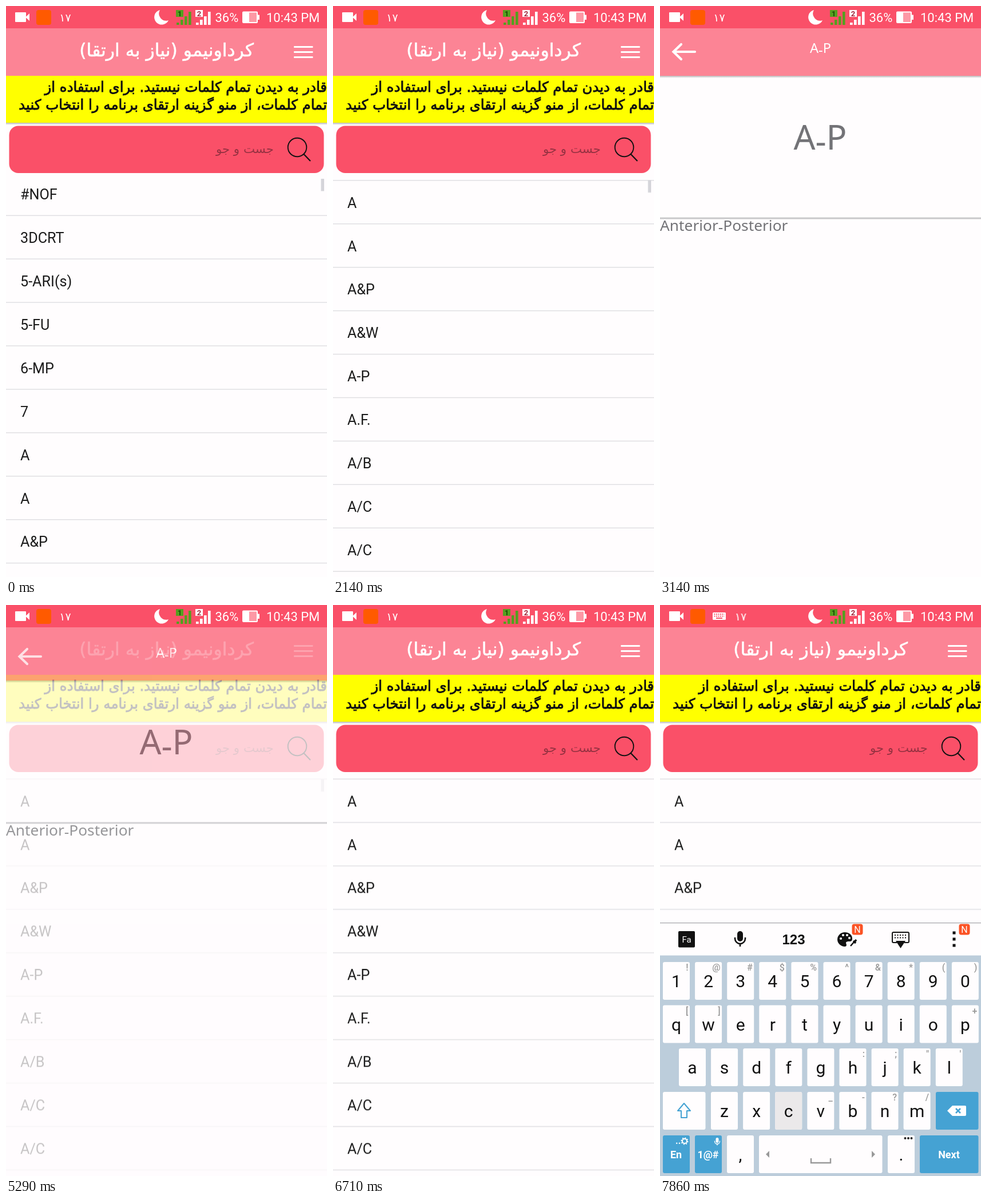
Recreate the animation shown at these times as an HTML page. Size 561 by 998 pixels, loop 8000 ms.

```html
<!DOCTYPE html>
<html lang="fa">
<head>
<meta charset="utf-8">
<style>
html, body { margin: 0; width: 100%; height: 100%; overflow: hidden; background: #fffdfe; }
svg { display: block; width: 561px; height: 998px; }
text { font-family: Roboto, sans-serif; white-space: pre; }
.fa { font-family: "DejaVu Sans", sans-serif; direction: rtl; }
.page { font-family: "Noto Sans", "Open Sans", sans-serif; }
.num { font-family: "Liberation Sans", Arial, sans-serif; font-weight: bold; }
.banner { stroke: #111; stroke-width: .9; }
</style>
</head>
<body>
<script>
const LOOP = 8000, ROW = 75.93;
const PINK = '#fc8495', RED = '#fa5068', PAPER = '#fffdfe', BLUE = '#45a2d3';

const rect = (x, y, w, h, fill, rx = 0, more = '') =>
  `<rect x="${x}" y="${y}" width="${w}" height="${h}" fill="${fill}" rx="${rx}" ${more}/>`;
const text = (s, x, y, size, fill, more = '') =>
  `<text x="${x}" y="${y}" font-size="${size}" fill="${fill}" ${more}>${s.replace(/&/g, '&amp;')}</text>`;
const path = (d, fill, more = '') => `<path d="${d}" fill="${fill}" ${more}/>`;
const line = (d, stroke, width, more = '') =>
  path(d, 'none', `stroke="${stroke}" stroke-width="${width}" ${more}`);
const group = (id, body, more = '') => `<g id="${id}" ${more}>${body}</g>`;
const MID = 'text-anchor="middle"', END = 'text-anchor="end"', BOLD = 'font-weight="bold"';

function signal(x, n, color, ink) {
  const bars = [4, 9, 15, 23].map((h, i) => rect(x + 1 + i * 7, 33 - h, 4.6, h, color)).join('');
  return bars + rect(x, 7, 13, 12, color) + text(n, x + 6.5, 17.5, 13, ink, `${MID} ${BOLD}`);
}

// Small keyboard glyph: frame with rows of dots
function dots(x, y, w, rows, step, color) {
  let d = '';
  for (let r = 0; r < rows; r++) d += `M${x} ${y + r * step}h${w}`;
  return line(d, color, 2, `stroke-dasharray="2 ${step - 2}"`);
}

const mic = (x, y, k, color) => `<g transform="translate(${x} ${y}) scale(${k})">` +
  rect(-5, -14, 10, 18, color, 5) +
  line('M-9-3v2a9 9 0 0 0 18 0v-2M0 8v5', color, 2.6) + '</g>';

function statusBar() {
  return rect(0, 0, 561, 39, RED) +
    rect(16, 11, 19, 17, '#fff', 1) + path('M34 19.5L41 13V26Z', '#fff') +
    rect(53, 7, 26, 26, '#ff5a00', 4) +
    group('imeIcon', rect(92, 13, 23, 13, '#fff', 1.5) + dots(94.5, 16, 18, 2, 3.5, RED) + line('M98 23h11', RED, 2)) +
    group('count', text('١٧', 103.5, 27, 19, '#fff', `class="fa" ${MID}`)) +
    path('M269 7A13 13 0 1 0 284 25A12.5 12.5 0 0 1 269 7Z', '#fff') +
    signal(297, '1', '#55a01f', '#1d4a08') + signal(331, '2', '#fff', '#a3283c') +
    text('36%', 365.5, 28, 22, '#fff') +
    rect(414, 10.5, 25, 18.5, '#fd98a5', 1, 'stroke="#fff" stroke-width="2"') +
    rect(414, 11, 11, 18, '#fff') + rect(440, 15.5, 3, 8.5, '#fff') +
    text('10:43 PM', 455, 28, 22, '#fff');
}

const WORDS = ['#NOF', '3DCRT', '5-ARI(s)', '5-FU', '6-MP', '7', 'A', 'A', 'A&P', 'A&W', 'A-P', 'A.F.', 'A/B', 'A/C', 'A/C', 'A/G'];

function listPage() {
  const rows = WORDS.map((w, i) =>
    text(w, 25, 338 + i * ROW, 25.2, '#1b1b1b') + rect(0, 365.5 + i * ROW, 561, 1.4, '#dedee1')).join('');
  const ripple = group('ripple', rect(0, 366.5 + 9 * ROW, 561, ROW - 1, '#000'));
  return rect(0, 39, 561, 959, PAPER) +
    `<g clip-path="url(#listArea)">${group('list', ripple + rows)}</g>` +
    group('bar', rect(550.5, 302, 5.5, 21.5, '#d5d5da')) +
    rect(0, 39, 561, 83, PINK) +
    text('کرداونیمو (نیاز به ارتقا)', 433, 88, 31.5, '#fff', 'class="fa" stroke="#fff" stroke-width=".6"') +
    [71.5, 80.5, 89.5].map(y => rect(503, y - 1.5, 33.5, 3, '#fff', 1)).join('') +
    rect(0, 204, 561, 4, 'url(#shade)') + rect(0, 122, 561, 82, '#ff0') +
    text('قادر به دیدن تمام کلمات نیستید. برای استفاده از', 561, 150, 24.4, '#111', 'class="fa banner"') +
    text('تمام کلمات، از منو گزینه ارتقای برنامه را انتخاب کنید', 561, 181, 24.4, '#111', 'class="fa banner"') +
    rect(5.5, 209.5, 550, 82.5, RED, 16) +
    text('جست و جو', 468, 257, 21.3, '#963242', 'class="fa"') +
    group('caret', rect(467.5, 231, 1.3, 40, '#c98a92')) +
    '<circle cx="509" cy="247" r="16.3" fill="none" stroke="#111" stroke-width="1.9"/>' +
    line('M520.5 259L532 271', '#111', 2.2);
}

function detailPage() {
  const hyphen = (size, up) => `A<tspan dy="${up}">-</tspan><tspan dy="${-up}">P</tspan>`;
  return rect(0, 39, 561, 959, PAPER) + rect(0, 122, 561, 4, 'url(#shade)') +
    rect(0, 39, 561, 83, PINK) +
    line('M61 80H24M37 67L23.5 80L37 93', '#fff', 4.2, 'stroke-linecap="round"') +
    text(hyphen(23.6, 3), 280.5, 82, 23.6, '#fff', `class="page" ${MID}`) +
    text(hyphen(60, 7), 280, 251, 59.5, '#737377', `class="page" ${MID}`) +
    rect(0, 369.5, 561, 3, '#c9c9cb') +
    text('Anterior<tspan dy="3">-</tspan><tspan dy="-3">Posterior</tspan>', 0, 393, 26.3, '#737377', 'class="page"');
}

function key(x, y, w, label, hint = '', fill = PAPER, size = 30) {
  return rect(x, y, w, 66, fill, 3) +
    text(label, x + w / 2, y + 44, size, '#111', MID) +
    text(hint, x + w - 2.5, y + 15, 16, '#999', `${END} font-weight="500"`);
}

// Each row: letters, left edge, top edge, hints (space = none)
const KEY_ROWS = [
  ['1234567890', 5, 624, '!@#$%^&*()'],
  ['qwertyuiop', 5, 699.5, '[]       +'],
  ['asdfghjkl', 33, 775, '     :;"\''],
  ['zxcvbnm', 89, 851, '   _-?/']
];

function badge(x, y) {
  return rect(x - 9.5, y - 9.5, 19, 19, '#fb5325', 4) + text('N', x, y + 6, 16, '#fff', MID);
}

function toolbar() {
  const holes = [[-7, -1], [-3, -7], [4, -7], [8, -2]].map(([x, y]) =>
    `<circle cx="${323 + x}" cy="${584 + y}" r="2.1" fill="${PAPER}"/>`).join('');
  return rect(0, 555, 561, 58, PAPER) + rect(0, 555, 561, 1.3, '#a9a9ad') +
    rect(32, 570, 29, 28.5, '#111', 2) + text('Fa', 46.5, 590, 15, '#fff', MID) +
    mic(140, 584, 1, '#111') +
    text('123', 233.5, 592.5, 24, '#111', `class="num" ${MID}`) +
    path('M323 572a13 12.5 0 0 0 0 25c4 0 3-4 2-6c0-3 3-3 6-3c4 0 5-2 5-5c0-7-6-11-13-11Z', '#111') + holes +
    line('M333 596L340 588', '#111', 2.5) + line('M338 587L342 591M340 589L343 585', '#111', 3.4) +
    badge(345, 567) +
    line('M414 590h-6q-2 0-2-2v-14q0-2 2-2h25q2 0 2 2v14q0 2-2 2h-6', '#111', 2) +
    dots(410, 577, 21, 2, 4.5, '#111') + path('M412 587H429L420.5 600Z', '#111') +
    [573, 584, 595].map(y => rect(511.5, y - 2.5, 5, 5, '#111')).join('') + badge(532, 567);
}

function keyboard() {
  const keys = KEY_ROWS.map(([letters, x, y, hints]) => [...letters].map((c, i) =>
    key(x + i * 56.1, y, 47, c, (hints[i] || '').trim())).join('')).join('');
  const white = (s, x) => text(s, x, 967, 18, '#fff', `${MID} ${BOLD}`);
  return toolbar() + rect(0, 612.5, 561, 386, '#bccddb') + keys +
    group('pressed', key(201.2, 851, 47, 'c', '', '#ebe9ea')) +
    key(5, 851, 74.5, '') +
    path('M42 871L53 884H47V896H37V884H31Z', 'none', `stroke="${BLUE}" stroke-width="2" stroke-linejoin="round"`) +
    key(482, 851, 74.5, '', '', BLUE) +
    path('M502 884L511 875H533q2 0 2 2V891q0 2-2 2H511Z', '#fff') +
    line('M517 880L525 888M525 880L517 888', BLUE, 2.6) +
    key(5, 927, 47, '', '', BLUE) + white('En', 28) +
    text('..', 27, 942, 16, '#fff', BOLD) +
    '<circle cx="43" cy="937" r="4" fill="none" stroke="#fff" stroke-width="2"/>' +
    '<circle cx="43" cy="937" r="5.7" fill="none" stroke="#fff" stroke-width="1.6" stroke-dasharray="2.2"/>' +
    key(61, 927, 47, '', '', BLUE) + white('1@#', 84) + mic(100, 938, .5, '#fff') +
    key(117, 927, 47, ',') + key(173, 927, 215.5, '') +
    path('M191 954V966L185 960ZM370 954V966L376 960Z', '#999') +
    line('M264 967V975H298V967', '#999', 2.4) +
    key(398, 927, 47, '.') +
    [428.5, 434, 439.5].map(x => `<circle cx="${x}" cy="932" r="2" fill="#222"/>`).join('') +
    key(454, 927, 102.5, '', '', BLUE) + white('Next', 505);
}

document.body.innerHTML = `<svg viewBox="0 0 561 998">
<defs>
  <clipPath id="listArea"><rect y="292" width="561" height="706"/></clipPath>
  <clipPath id="imeArea"><rect y="555" width="561" height="443"/></clipPath>
  <linearGradient id="shade" x2="0" y2="1"><stop stop-color="#000" stop-opacity=".28"/><stop offset="1" stop-color="#000" stop-opacity="0"/></linearGradient>
</defs>` +
  listPage() + group('detail', detailPage()) + statusBar() +
  `<g clip-path="url(#imeArea)">` +
  group('backdrop', rect(0, 555, 561, 443, PINK) + '<circle cx="265" cy="552" r="42" fill="#222"/>') +
  group('ime', keyboard()) + '</g></svg>';

// Holds each [time, value] until the next step
function play(id, prop, steps, format = v => v) {
  const frames = steps.map(([t, v]) => ({ offset: t / LOOP, [prop]: format(v), easing: 'step-end' }));
  frames.push({ offset: 1, [prop]: format(steps[steps.length - 1][1]) });
  document.getElementById(id).animate(frames, { duration: LOOP, iterations: Infinity }).startTime = 0;
}
const moveY = v => `translate(0px, ${v}px)`;
const shown = (id, from, to = LOOP) =>
  play(id, 'opacity', [[0, 0], [from, 1], ...(to < LOOP ? [[to, 0]] : [])]);

const scroll = [[0, 0], [1290, 155], [1430, 258], [1570, 332], [1710, 382], [1860, 414], [2000, 432], [2140, 441], [2290, 441.7]];
play('list', 'transform', scroll, v => moveY(-v));
play('bar', 'transform', scroll, v => moveY(v / 176));
play('bar', 'opacity', [[0, 1], [2570, .6], [2710, .2], [2860, 0], [5290, 1], [6430, .6], [6570, .2], [6710, 0]]);
play('ripple', 'opacity', [[0, 0], [2570, .06], [2710, .12], [2860, 0]]);

play('detail', 'opacity', [[0, 0], [2860, .45], [3000, .9], [3140, 1], [5290, .75], [5430, .2], [5570, 0]]);
play('detail', 'transform', [[0, 60], [2860, 32], [3000, 8], [3140, 0], [5290, 10], [5430, 40], [5570, 60]], moveY);

shown('backdrop', 6860, 7290);
play('ime', 'opacity', [[0, 0], [6860, .2], [7000, .6], [7140, .9], [7290, 1]]);
play('ime', 'transform', [[0, 90], [6860, 62], [7000, 28.5], [7140, 8], [7290, 0]], moveY);
shown('imeIcon', 6860);
play('count', 'transform', [[0, 0], [6860, 37.5]], v => `translate(${v}px, 0px)`);
shown('caret', 6860, 7430);
shown('pressed', 7860);
</script>
</body>
</html>
```
